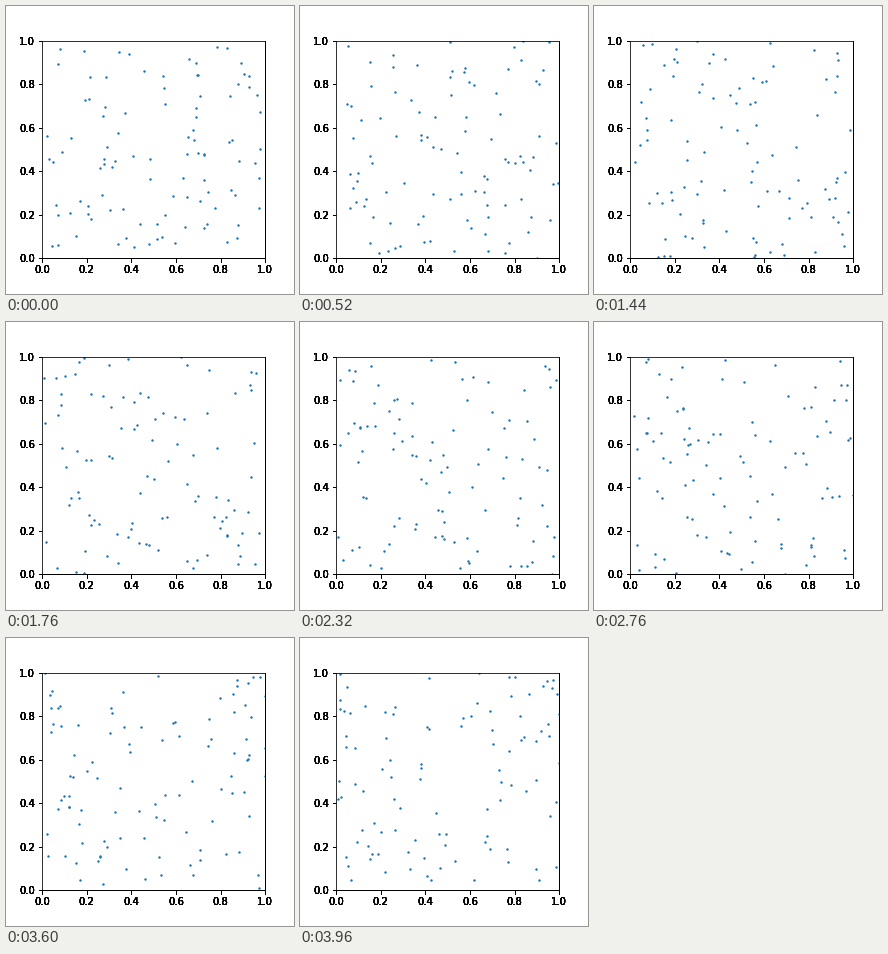
A matplotlib script that plays this animation: 288x288 px, repeating every 4000 ms.

```python
import numpy as np
import matplotlib.pyplot as plt
from matplotlib.animation import FuncAnimation

FRAMES, INTERVAL = 100, 40
COUNT = 100
MAX_SPEED = 0.015  # box widths per frame
BACKING = 6        # stacked axes that darken the labels and outer edges

rng = np.random.RandomState(3)
start = rng.uniform(0, 1, (COUNT, 2))
velocity = rng.uniform(-MAX_SPEED, MAX_SPEED, (COUNT, 2))


def positions(n):
    """Straight motion folded back into the unit box at its walls."""
    return 1 - np.abs(1 - (start + velocity * n) % 2)


plt.rcParams["font.family"] = "DejaVu Sans"
plt.rcParams["font.size"] = 10

fig = plt.figure(figsize=(4, 4), dpi=72, facecolor="white")
left, right, bottom, top = 0.125, 0.9, 0.125, 0.88
box = (left, bottom, right - left, top - bottom)


def add_box():
    return fig.add_axes(box, xlim=(0, 1), ylim=(0, 1))


# The last, opaque box covers the insides of the ones below it.
for _ in range(BACKING):
    add_box()
ax = add_box()
dots = ax.scatter(*positions(0).T, s=2, color="tab:blue")


def update(n):
    dots.set_offsets(positions(n))
    return (dots,)


anim = FuncAnimation(fig, update, frames=FRAMES, interval=INTERVAL,
                     repeat=True, repeat_delay=0)
plt.show()
```
